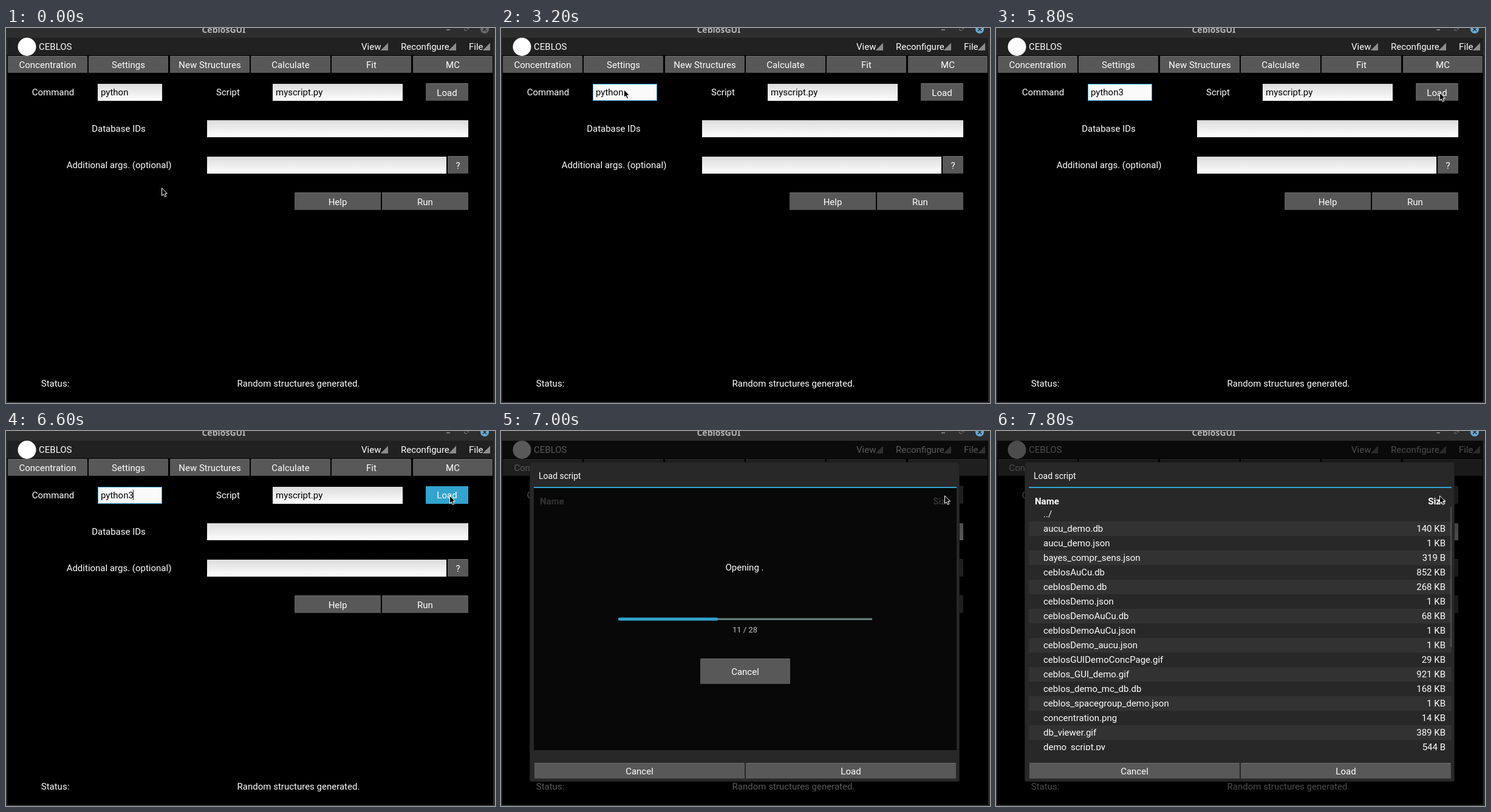
These frames come from a looping animation (805x618 px, 8 s). An HTML page:

```html
<!DOCTYPE html>
<html lang="en">
<head>
<meta charset="utf-8">
<title>Script runner</title>
<style>
  html, body { margin: 0; width: 100%; height: 100%; overflow: hidden; background: #000; }
  svg { display: block; width: 805px; height: 618px; }
  text { font: 15px Roboto, sans-serif; fill: #fff; white-space: pre; }
  .ink { fill: #000; }
  .bold { font-weight: 700; }
  .caption { font: 700 14px "Noto Sans", "Open Sans", sans-serif; fill: #b4b4b4; }
</style>
</head>
<body>
<svg id="stage" viewBox="0 0 805 618" width="805" height="618">
  <defs>
    <linearGradient id="field" x1="0" y1="0" x2="0" y2="1">
      <stop offset="0" stop-color="#dcdcdc"/><stop offset="1" stop-color="#fefefe"/>
    </linearGradient>
    <clipPath id="listClip"><rect x="54" y="125" width="696" height="401"/></clipPath>
  </defs>
</svg>
<script>
const NS = 'http://www.w3.org/2000/svg';
const LOOP = 8000;
const BLUE = '#32a4ce';
const stage = document.getElementById('stage');

function add(parent, tag, attrs, content) {
  const el = document.createElementNS(NS, tag);
  for (const key in attrs) el.setAttribute(key, attrs[key]);
  if (content !== undefined) el.textContent = content;
  parent.appendChild(el);
  return el;
}
const group = (parent, attrs = {}) => add(parent, 'g', attrs);
const box = (parent, x, y, width, height, fill, extra = {}) =>
  add(parent, 'rect', { x, y, width, height, fill, ...extra });
const label = (parent, str, x, y, anchor = 'start', extra = {}) =>
  add(parent, 'text', { x, y, 'text-anchor': anchor, ...extra }, str);

function button(parent, str, x, y, w, h) {
  const face = box(parent, x, y, w, h, '#585858', { rx: 1 });
  box(parent, x + 1, y, w - 2, 1, '#717171');
  box(parent, x + 1, y + h - 1, w - 2, 1, '#4a4a4a');
  label(parent, str, x + w / 2, y + Math.round(h / 2) + 6, 'middle');
  return face;
}

function input(parent, str, x, y, w) {
  const face = box(parent, x, y, w, 28, 'url(#field)');
  const value = label(parent, str, x + 5, y + 19, 'start', { class: 'ink' });
  return { face, value };
}

// Window frame
box(stage, 0, 0, 805, 618, '#2e2e2e');
label(stage, 'CeblosGUI', 358.5, 8, 'middle', { class: 'caption' });
box(stage, 725, 2, 6, 2, '#7c7c7c');
add(stage, 'path', { d: 'M757 0h4v3M755 1v3h4', stroke: '#7c7c7c', fill: 'none' });
const closeDot = add(stage, 'circle', { cx: 788, cy: 2, r: 7 });
add(stage, 'path', { d: 'M785 -1l6 6M791 -1l-6 6', stroke: '#2e2e2e', 'stroke-width': 1.6 });

// Main page
const page = group(stage);
box(page, 2, 16, 800, 600, '#000');
box(page, 2, 16, 800, 29, '#212121');
add(page, 'circle', { cx: 34.5, cy: 31, r: 15, fill: '#fff' });
label(page, 'CEBLOS', 54, 36);
for (const [str, x, corner] of [['View', 585, 629], ['Reconfigure', 650, 741], ['File', 762, 797]]) {
  label(page, str, x, 36);
  add(page, 'path', { d: `M${corner} 24.5v12.5h-12.5z`, fill: '#8b8b8b' });
}
['Concentration', 'Settings', 'New Structures', 'Calculate', 'Fit', 'MC'].forEach((str, i) =>
  button(page, str, Math.round(2.9 + i * 133.35), 46, 131, 28));

label(page, 'Command', 77.5, 111, 'middle');
label(page, 'Script', 365.5, 111, 'middle');
label(page, 'Database IDs', 185.5, 171, 'middle');
label(page, 'Additional args. (optional)', 186, 231, 'middle');
label(page, 'Status:', 81, 591, 'middle');
label(page, 'Random structures generated.', 481.5, 591, 'middle');
const command = input(page, 'python', 151, 92, 106);
const focusRing = box(page, 151.5, 92.5, 105, 27, 'none', { stroke: BLUE });
const caret = box(page, 201, 97, 1, 17, '#222');
input(page, 'myscript.py', 439, 92, 214);
input(page, '', 331, 152, 430);
input(page, '', 331, 212, 394);
const pressed = group(page);
button(page, 'Load', 691, 91, 70, 29);
pressed.remove();
page.appendChild(pressed);
box(pressed, 691, 91, 70, 29, BLUE, { rx: 1 });
label(pressed, 'Load', 726, 111, 'middle');
button(page, '?', 727, 211, 34, 29);
button(page, 'Help', 475, 271, 142, 29);
button(page, 'Run', 619, 271, 142, 29);

const dim = box(stage, 2, 16, 800, 600, '#000');

// File dialog
const dialog = group(stage);
box(dialog, 47, 51, 708, 527, '#1c1c1c', { rx: 3 });
box(dialog, 48, 52, 706, 525, '#282828', { rx: 2 });
label(dialog, 'Load script', 62, 79, 'start', { style: 'font-size:14px' });
label(dialog, 'Name', 64, 121, 'start', { class: 'bold' });
label(dialog, 'Size', 740, 121, 'end', { class: 'bold' });

const list = group(dialog, { 'clip-path': 'url(#listClip)' });
const files = [
  '../', 'aucu_demo.db|140 KB', 'aucu_demo.json|1 KB', 'bayes_compr_sens.json|319 B',
  'ceblosAuCu.db|852 KB', 'ceblosDemo.db|268 KB', 'ceblosDemo.json|1 KB',
  'ceblosDemoAuCu.db|68 KB', 'ceblosDemoAuCu.json|1 KB', 'ceblosDemo_aucu.json|1 KB',
  'ceblosGUIDemoConcPage.gif|29 KB', 'ceblos_GUI_demo.gif|921 KB', 'ceblos_demo_mc_db.db|168 KB',
  'ceblos_spacegroup_demo.json|1 KB', 'concentration.png|14 KB', 'db_viewer.gif|389 KB',
  'demo_script.py|544 B'
];
files.forEach((entry, i) => {
  const [name, size = ''] = entry.split('|');
  const y = 125 + i * 24;
  if (i % 2) box(list, 54, y, 696, 24, '#323232');
  label(list, name, 78, y + 17);
  label(list, size, 740, y + 17, 'end');
});
const scrollbar = box(list, 748, 125, 2, 231, '#b3b3b3');

const progress = group(dialog);
box(progress, 54, 94, 696, 432, '#000', { 'fill-opacity': 0.8 });
label(progress, 'Opening .', 401, 230, 'middle');
box(progress, 193, 308.5, 418, 3, '#6c8583');
const fill = box(progress, 193, 307.5, 0, 5, BLUE, { rx: 2 });
const count = label(progress, '', 401.5, 332, 'middle', { style: 'font-size:13px;fill:#c4c4c4' });
button(progress, 'Cancel', 328, 375, 148, 42);

box(dialog, 54, 92, 696, 2, BLUE);
button(dialog, 'Cancel', 55, 547, 346, 26);
button(dialog, 'Load', 403, 547, 346, 26);

const pointer = add(stage, 'path', {
  d: 'M.5 .7V13.4L3.4 10.8L5.4 15.4L7.6 14.4L5.6 9.9H9.4Z',
  fill: '#000', stroke: '#fff', 'stroke-linejoin': 'round'
});

// Stepped tracks: [start time, value...]
const moves = [
  [0, 256, 263], [200, 246, 240], [400, 205, 160], [600, 187, 115], [1000, 188, 115],
  [1400, 202, 101], [4400, 292, 110], [4600, 405, 115], [4800, 471, 102], [5000, 480, 105],
  [5200, 482, 104], [5400, 560, 97], [5600, 682, 96], [5800, 730, 106]
];
const blinks = [
  [0, 0], [1800, 1], [2200, 0], [2800, 1], [3200, 0], [3400, 1], [3800, 0],
  [4200, 1], [4800, 0], [5400, 1], [5800, 0], [6400, 1]
];
const dims = [[0, 0], [7000, 0.65], [7200, 0.7]];
const loaded = [[0, 0], [7000, 11], [7200, 24]];
const fades = [[0, 0.75], [7600, 0.5], [7800, 0.28]];

const at = (track, t) => track.filter(step => step[0] <= t).pop().slice(1);
const show = (el, on) => el.setAttribute('visibility', on ? 'visible' : 'hidden');
// Nested parts inherit from their group unless hidden themselves.
const reveal = (el, on) => { el.style.display = on ? '' : 'none'; };

function render(t) {
  const focused = t >= 1800;
  const typed = t >= 3400;
  const [x, y] = at(moves, t);
  pointer.setAttribute('transform', `translate(${x} ${y})`);

  closeDot.setAttribute('fill', focused ? '#68a9d6' : '#686868');
  command.face.setAttribute('fill', focused ? '#fafafa' : 'url(#field)');
  command.value.textContent = typed ? 'python3' : 'python';
  show(focusRing, focused);
  caret.setAttribute('x', typed ? 209 : 201);
  show(caret, at(blinks, t)[0]);
  reveal(pressed, t >= 6600 && t < 6800);

  dim.setAttribute('opacity', at(dims, t)[0]);
  reveal(dialog, t >= 6800);
  reveal(progress, t >= 7000 && t < 7400);
  reveal(list, t >= 7400);
  const n = at(loaded, t)[0];
  fill.setAttribute('width', 418 * n / 28);
  count.textContent = `${n} / 28`;
  scrollbar.setAttribute('opacity', at(fades, t)[0]);
}

const start = performance.now();
function tick() {
  render((performance.now() - start) % LOOP);
  requestAnimationFrame(tick);
}
tick();
</script>
</body>
</html>
```
